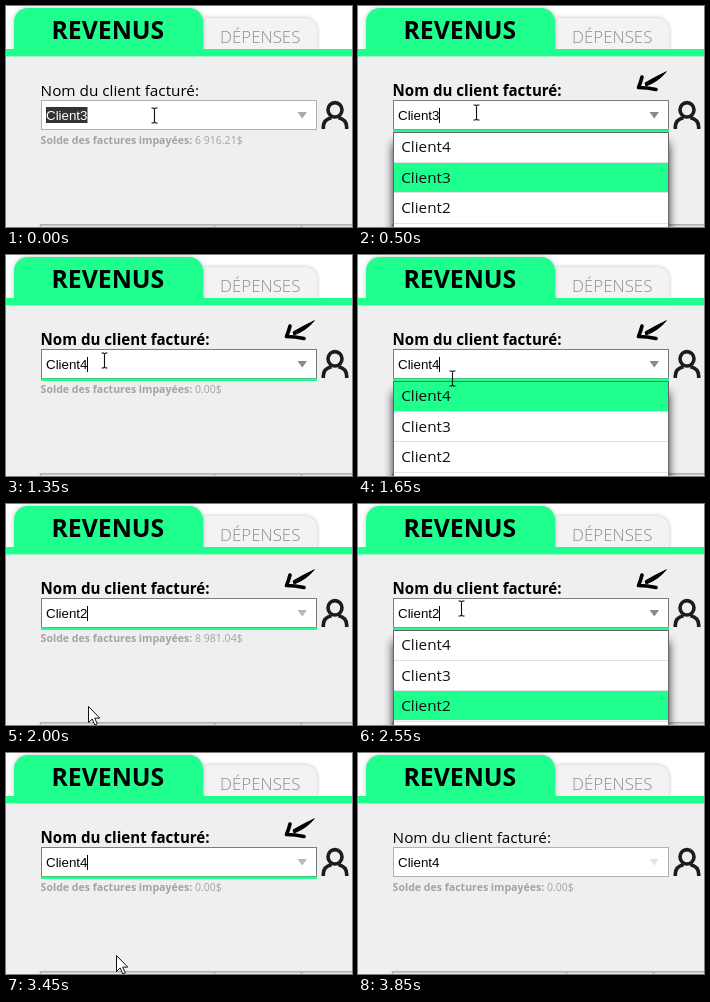
Recreate the animation shown at these times as an HTML page. Size 346 by 221 pixels, loop 3900 ms.

```html
<!DOCTYPE html>
<html lang="fr">
<head>
<meta charset="utf-8">
<title>Nom du client facturé</title>
<style>
  html, body { margin: 0; width: 100%; height: 100%; overflow: hidden; background: #efefef; }
  svg { display: block; width: 100vw; height: 100vh; }
  text { font-family: "Open Sans", "Noto Sans", sans-serif; white-space: pre; }
  .input { font: 13.333px "Liberation Sans", Arial, sans-serif; }
  .label { font-size: 15.3px; }
  .label[font-weight="700"] { font-size: 15.1px; }
  .balance { font-size: 10.55px; fill: #a3a3a3; }
  .item { font-size: 15.3px; fill: #111; }
  .tab { filter: drop-shadow(0 0 2px rgba(0, 0, 0, .25)); }
  .panel { filter: drop-shadow(0 11px 5px rgba(0, 0, 0, .8)); }
  .bold { font-weight: 700; }
</style>
</head>
<body>
<svg viewBox="0 0 346 221">
  <rect width="346" height="221" fill="#efefef"/>
  <rect width="346" height="44" fill="#fff"/>
  <path class="tab" d="M198 46V12H299A12 12 0 0 1 311 24V46Z" fill="#f3f3f3"/>
  <path class="tab" d="M8 46V16A14 14 0 0 1 22 2H183A14 14 0 0 1 197 16V46Z" fill="#1eff8e"/>
  <rect y="43" width="346" height="7.4" fill="#1eff8e"/>
  <text class="bold" x="45.4" y="33" font-size="24.8">REVENUS</text>
  <text x="214" y="37" font-size="16.9" font-weight="300" fill="#8c8c8c">DÉPENSES</text>

  <rect x="34" y="218" width="312" height="3" fill="#e2e2e2"/>
  <path d="M34 218.8H346M34.5 218V221M208.5 218V221M295.5 218V221" stroke="#b0b0b0" stroke-width="1.5"/>

  <text class="label" id="label" x="34.6" y="90">Nom du client facturé:</text>
  <rect id="field" x="35.5" y="94.5" width="275" height="29" fill="#fff"/>
  <rect id="underline" x="35" y="123.5" width="276" height="2.5" fill="#1eff8e"/>
  <path id="triangle" d="M291.5 106H301L296.25 112.5Z"/>
  <rect id="selection" x="40" y="101" width="41.5" height="16" fill="#333"/>
  <text class="input" id="value" x="40" y="114"></text>
  <path id="caret" d="M81.5 102V117" stroke="#000"/>
  <text class="balance" x="34.6" y="138"><tspan class="bold">Solde des factures impayées:</tspan><tspan id="balance"></tspan></text>

  <g fill="none" stroke="#1c1c1c" stroke-width="3.6">
    <ellipse cx="329" cy="103.8" rx="7" ry="7.2"/>
    <path d="M317.3 123V121Q317.5 113.5 325.5 111.8M332.5 111.8Q340.5 113.5 340.7 121V123"/>
  </g>
  <g id="arrow" stroke="#000" stroke-linecap="round" stroke-linejoin="round">
    <path d="M308 66Q299 70 287 77L288 80Q301 75 308 66Z" stroke-width="1"/>
    <path d="M284 71Q282.5 77 280.5 81.5Q289 81.5 298 83.5" fill="none" stroke-width="3.6"/>
  </g>

  <g id="list">
    <rect class="panel" x="35.5" y="126.5" width="275" height="120" fill="#fff" stroke="#666"/>
    <path d="M36 156.5H310M36 186.5H310M36 217.5H310" stroke="#e2e2e2"/>
    <rect id="highlight" x="36" width="274" height="29" fill="#1eff8e"/>
    <text class="item" x="43.2" y="145.5">Client4</text>
    <text class="item" x="43.2" y="176.5">Client3</text>
    <text class="item" x="43.2" y="206.5">Client2</text>
  </g>

  <path id="ibeam" d="M-3 -7.5H-1L0 -6.5L1 -7.5H3M0 -6.5V6.5M-3 7.5H-1L0 6.5L1 7.5H3" fill="none" stroke="#111" stroke-width="1.1"/>
  <path id="pointer" d="M0 0V16L3.7 12.5L6.3 18.5L8.8 17.4L6.2 11.6H11.3Z" fill="#fff" stroke="#111"/>
</svg>
<script>
const LOOP = 3900, STEP = 50, FOCUS = 50, BLUR = 3850, CARET_OFF = 3500;
const ui = Object.fromEntries([...document.querySelectorAll('[id]')].map(el => [el.id, el]));
const items = ['Client4', 'Client3', 'Client2'];
const balances = { Client4: '0.00$', Client3: '6 916.21$', Client2: '8 981.04$' };

// [time, selected client]
const choices = [[0, 'Client3'], [950, 'Client4'], [1950, 'Client2'], [3000, 'Client4']];
// [opens, closes]
const openings = [[350, 950], [1450, 1950], [2450, 3000]];
// [time, x, y]
const path = [
  [0, 148, 109], [500, 118, 106], [600, 117, 108], [800, 106, 140], [1000, 104, 143],
  [1100, 103, 140], [1300, 98, 106], [1350, 98, 105], [1600, 96, 107], [1900, 83, 200],
  [2000, 82, 202], [2150, 82, 200], [2400, 103, 106], [2550, 103, 104], [2700, 101, 107],
  [2950, 92, 148], [3050, 91, 150], [3300, 100, 165], [3550, 116, 226], [3900, 116, 226]
];

function cursorAt(t) {
  const i = Math.max(1, path.findIndex(p => p[0] >= t));
  const [t0, x0, y0] = path[i - 1], [t1, x1, y1] = path[i];
  const k = (t - t0) / (t1 - t0);
  return [Math.round(x0 + (x1 - x0) * k), Math.round(y0 + (y1 - y0) * k)];
}

const show = (el, on) => el.setAttribute('visibility', on ? 'visible' : 'hidden');

function draw(t) {
  const [x, y] = cursorAt(t);
  const client = choices.filter(c => c[0] <= t).pop()[1];
  const open = openings.some(([a, b]) => t >= a && t < b);
  const focused = t >= FOCUS && t < BLUR;
  const overField = y < 126;

  ui.value.textContent = client;
  ui.balance.textContent = ' ' + balances[client];
  ui.label.setAttribute('font-weight', focused ? 700 : 400);
  ui.field.setAttribute('stroke', focused ? '#7c7c7c' : '#b0b0b0');
  ui.triangle.setAttribute('fill', t >= BLUR ? '#e4e4e4' : !focused ? '#ababab' : overField ? '#8a8a8a' : '#b8b8b8');
  ui.value.setAttribute('fill', t < FOCUS ? '#fff' : '#000');
  show(ui.selection, t < FOCUS);
  show(ui.underline, focused);
  show(ui.arrow, focused);
  show(ui.caret, focused && t < CARET_OFF);

  show(ui.list, open);
  const row = overField ? items.indexOf(client) : Math.min(2, Math.floor((y - 126) / 30.5));
  ui.highlight.setAttribute('y', 127 + 30 * row);
  show(ui.highlight, open);

  show(ui.ibeam, overField);
  show(ui.pointer, !overField);
  ui.ibeam.setAttribute('transform', `translate(${x + .5} ${y + .5})`);
  ui.pointer.setAttribute('transform', `translate(${x + .5} ${y + .5})`);
}

const start = performance.now();
function tick() {
  const t = (performance.now() - start) % LOOP;
  draw(Math.floor(t / STEP) * STEP);
  requestAnimationFrame(tick);
}
tick();
</script>
</body>
</html>
```
